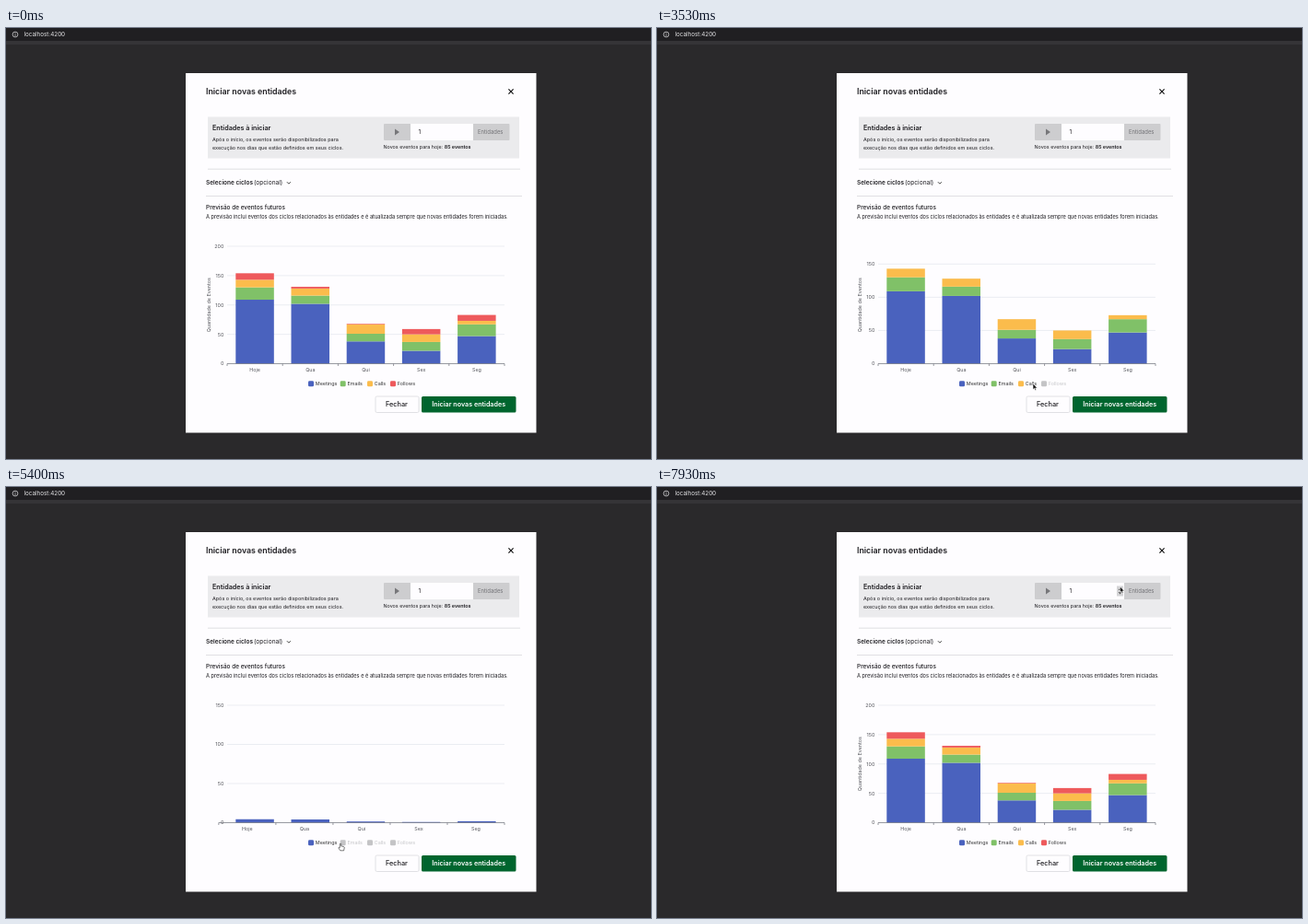
These frames come from a looping animation (700 by 468 pixels, 8000 ms). An HTML page:

```html
<!DOCTYPE html>
<html lang="pt">
<head>
<meta charset="utf-8">
<title>Iniciar novas entidades</title>
<style>
  html, body { margin: 0; width: 100%; height: 100%; overflow: hidden; background: #2a292b; }
  svg { display: block; width: 700px; height: 468px; }
  text { font-family: Inter, Roboto, sans-serif; fill: #1d1c20; }
  .bold { font-weight: 600; }
  .chart text { font-size: 5.4px; fill: #55565c; }
  .chart .legend { fill: #333; }
  .chart .off { fill: #c6c6c8; }
</style>
</head>
<body>
<svg viewBox="0 0 700 468">
  <rect width="700" height="468" fill="#2a292b"/>
  <rect width="700" height="14" fill="#201f22"/>
  <rect y="14" width="700" height="4" fill="#353437"/>
  <g fill="none" stroke="#d0d0d2" stroke-width=".8">
    <circle cx="10" cy="7" r="2.9"/>
    <path d="M10 6.6V8.7M10 5.2V5.9"/>
  </g>
  <text x="19.5" y="9.2" font-size="6.3" style="fill:#e6e6e8">localhost:4200</text>

  <rect x="195" y="49" width="380.5" height="390.5" fill="#fefdff"/>
  <text class="bold" x="217" y="72.2" font-size="8.8">Iniciar novas entidades</text>
  <path d="M545.4 66.4l5.2 5.2m0-5.2l-5.2 5.2" stroke="#111" stroke-width="1.2"/>

  <rect x="219" y="96.5" width="338" height="45" fill="#ebebed"/>
  <text class="bold" x="224" y="110.8" font-size="7.2">Entidades à iniciar</text>
  <g font-size="5.48">
    <text x="224" y="122.6">Após o início, os eventos serão disponibilizados para</text>
    <text x="224" y="131.7">execução nos dias que estão definidos em seus ciclos.</text>
  </g>
  <rect x="410" y="104" width="136.5" height="18" rx="1" fill="#cdcdcf"/>
  <rect x="439" y="104" width="68" height="18" fill="#fefdff"/>
  <path d="M422 109.5v7l5-3.5z" fill="#77777a"/>
  <text x="447.5" y="115.4" font-size="6.4">1</text>
  <text x="512" y="115.2" font-size="5.9" style="fill:#737377">Entidades</text>
  <text x="409.5" y="131.2" font-size="5.4">Novos eventos para hoje: <tspan class="bold">85 eventos</tspan></text>

  <path d="M219 153.2H558M217 182.5H560" stroke="#d9d9dc" stroke-width=".8"/>
  <text class="bold" x="217" y="170.3" font-size="6.5">Selecione ciclos</text>
  <text x="269" y="170.3" font-size="6.6">(opcional)</text>
  <path d="M304.9 167.2l2 2 2-2" fill="none" stroke="#333" stroke-width=".9"/>
  <text x="217" y="197.2" font-size="6.45" font-weight="500">Previsão de eventos futuros</text>
  <text x="217" y="206.7" font-size="5.66">A previsão inclui eventos dos ciclos relacionados às entidades e é atualizada sempre que novas entidades forem iniciadas.</text>

  <g class="chart" id="chart"></g>

  <rect x="401" y="400" width="47" height="17.5" rx="1.5" fill="#fefdff" stroke="#dadadd" stroke-width=".8"/>
  <text x="424" y="411.4" font-size="7.3" font-weight="500" text-anchor="middle">Fechar</text>
  <rect x="451" y="400" width="102.5" height="17.5" rx="1.5" fill="#00652e"/>
  <text class="bold" x="502.2" y="411.4" font-size="7.16" text-anchor="middle" style="fill:#fff">Iniciar novas entidades</text>

  <g id="spinner">
    <rect x="499" y="107.5" width="7" height="11" fill="#d4d4d6"/>
    <path d="M500.8 112l1.7-2.4 1.7 2.4zM500.8 114l1.7 2.4 1.7-2.4z" fill="#444"/>
  </g>
  <g id="cursor" stroke-linejoin="round" stroke-width=".6">
    <path id="arrow" d="M0 0V6.6L1.5 5.3 2.5 7.6 3.6 7.1 2.6 4.9H4.7Z" fill="#111" stroke="#fff"/>
    <path id="hand" d="M-.7 .5Q0-.4 .7 .5V2.9L3.6 3.5Q4.4 3.8 4.2 5L3.6 7.8H-.2L-2.2 4.9Q-1.9 3.8-.7 4.7Z" fill="#fff" stroke="#222"/>
  </g>
</svg>
<script>
const LOOP = 8000, BASE = 364.5, RIGHT = 541, LEFT = 240, EMPTY_LEFT = 226.5;
const WIDE = 127.5 / 200, TIGHT = 127.5 / 150; // pixels per unit
const days = ['Hoje', 'Qua', 'Qui', 'Sex', 'Seg'];
const series = [
  { name: 'Meetings', color: '#4a62be', x: 328, values: [109, 102, 38, 22, 47] },
  { name: 'Emails', color: '#80c168', x: 362.7, values: [21, 14, 13, 15, 20] },
  { name: 'Calls', color: '#fbbc4c', x: 392, values: [13, 12, 16, 13, 6] },
  { name: 'Follows', color: '#ee5a5c', x: 417, values: [11, 3, 1, 9, 10] }
];
// legend clicks: time, series, visible afterwards
const clicks = [
  [3300, 3, false], [3650, 2, false], [4100, 1, false], [4640, 0, false],
  [5185, 0, true], [5750, 1, true], [6380, 2, true], [6985, 3, true]
];
// cursor tip: time, x, y
const path = [
  [1300, 660, 430], [2000, 470, 412], [2500, 408, 386], [3050, 408, 386], [3250, 422, 386],
  [3340, 422, 386], [3510, 408, 386], [3750, 408, 386], [4000, 376, 386], [4180, 376, 386],
  [4500, 350, 387], [5200, 350, 387], [5400, 363, 387], [5600, 376, 386], [5900, 376, 386],
  [6250, 403, 386], [6500, 403, 386], [6850, 421.5, 385], [7120, 421.5, 385], [7600, 502.5, 108]
];
const $ = id => document.getElementById(id);
const lerp = (a, b, k) => a + (b - a) * k;
const clamp = k => Math.min(1, Math.max(0, k));
const ease = k => k < .5 ? 4 * k ** 3 : 1 - 4 * (1 - k) ** 3;
const smooth = k => k * k * (3 - 2 * k);

// A track is a start value and steps that each take over from the current value.
function track(start, steps, t) {
  let value = start;
  steps.forEach(({ at, to, dur = 500, from }, i) => {
    if (t < at) return;
    const end = Math.min(t, i + 1 < steps.length ? steps[i + 1].at : t);
    value = lerp(from ?? value, to, ease(clamp((end - at) / dur)));
  });
  return value;
}

const scaleAfter = at => at >= 3300 && at < 6985 ? TIGHT : WIDE;
const axisSteps = [{ at: 3300, to: TIGHT }, { at: 6985, to: WIDE }];
const leftSteps = [{ at: 4640, to: EMPTY_LEFT }, { at: 5185, to: LEFT }];

series.forEach((s, index) => {
  s.base = [];
  s.height = [];
  let visible = true;
  for (const [at, which, on] of clicks) {
    const to = scaleAfter(at), own = which === index;
    if (own) {
      visible = on;
      s[on ? 'shown' : 'hidden'] = at;
    }
    if (!visible) continue;
    s.base.push({ at, to, from: own ? to : undefined });
    s.height.push(own ? { at, to, from: 0, dur: 1000 } : { at, to });
  }
});

const line = (x1, y1, x2, y2, color) =>
  `<path d="M${x1} ${y1}L${x2} ${y2}" stroke="${color}" stroke-width=".7"/>`;
const label = (x, y, text, extra = 'text-anchor="middle"') =>
  `<text x="${x}" y="${y}" ${extra}>${text}</text>`;

function drawChart(t) {
  const out = [], empty = t >= 4640 && t < 5185;
  const left = track(LEFT, leftSteps, t), scale = track(WIDE, axisSteps, t);
  if (!empty) {
    const max = scaleAfter(t) === TIGHT ? 150 : 200;
    for (let v = 0; v <= max; v += 50) {
      const y = BASE - v * (v === 200 ? WIDE : scale);
      if (v) out.push(line(LEFT, y, RIGHT, y, '#e2e6ec'));
      out.push(label(236.3, y + 1.9, v, 'text-anchor="end"'));
    }
  }
  if (t < 4700 || t > 5450)
    out.push(label(0, 0, 'Quantidade de Eventos', 'text-anchor="middle" transform="translate(221.8 300.8) rotate(-90)"'));

  const stack = days.map(() => 0);
  for (const s of series) {
    const opacity = t >= s.hidden && t < s.shown ? 1 - clamp((t - s.hidden) / 200) : 1;
    const base = track(WIDE, s.base, t), height = track(WIDE, s.height, t);
    s.values.forEach((v, i) => {
      const h = v * height, x = LEFT + 60.2 * i + 9.3;
      if (opacity) out.push(`<rect x="${x}" y="${BASE - stack[i] * base - h}" width="41.5" height="${h}" fill="${s.color}" opacity="${opacity}"/>`);
      stack[i] += v;
    });
  }

  const band = (RIGHT - left) / days.length;
  out.push(line(left, BASE, RIGHT, BASE, '#6e7079'));
  for (let i = 0; i <= days.length; i++) {
    const x = left + band * i;
    out.push(line(x, BASE, x, BASE + 2.5, '#6e7079'));
    if (days[i]) out.push(label(x + band / 2, 372.8, days[i]));
  }

  for (const s of series) {
    const off = t >= s.hidden && t < s.shown;
    out.push(`<rect x="${s.x}" y="383.3" width="6" height="6" rx="1.4" fill="${off ? '#c4c4c6' : s.color}"/>`);
    out.push(label(s.x + 7.8, 388.3, s.name, `class="${off ? 'off' : 'legend'}"`));
  }
  $('chart').innerHTML = out.join('');
}

function drawCursor(t) {
  const next = path.findIndex(p => p[0] > t);
  const b = next < 0 ? path.at(-1) : path[next], a = next > 0 ? path[next - 1] : b;
  const k = a === b ? 1 : smooth((t - a[0]) / (b[0] - a[0]));
  const hand = t > 3700 && t < 7150;
  $('cursor').setAttribute('transform', `translate(${lerp(a[1], b[1], k)} ${lerp(a[2], b[2], k)})`);
  $('cursor').style.display = t < path[0][0] ? 'none' : '';
  $('hand').style.display = hand ? '' : 'none';
  $('arrow').style.display = hand ? 'none' : '';
  $('spinner').style.display = t > 7520 ? '' : 'none';
}

const start = performance.now();
function frame() {
  const t = (performance.now() - start) % LOOP;
  drawChart(t);
  drawCursor(t);
  requestAnimationFrame(frame);
}
frame();
</script>
</body>
</html>
```
